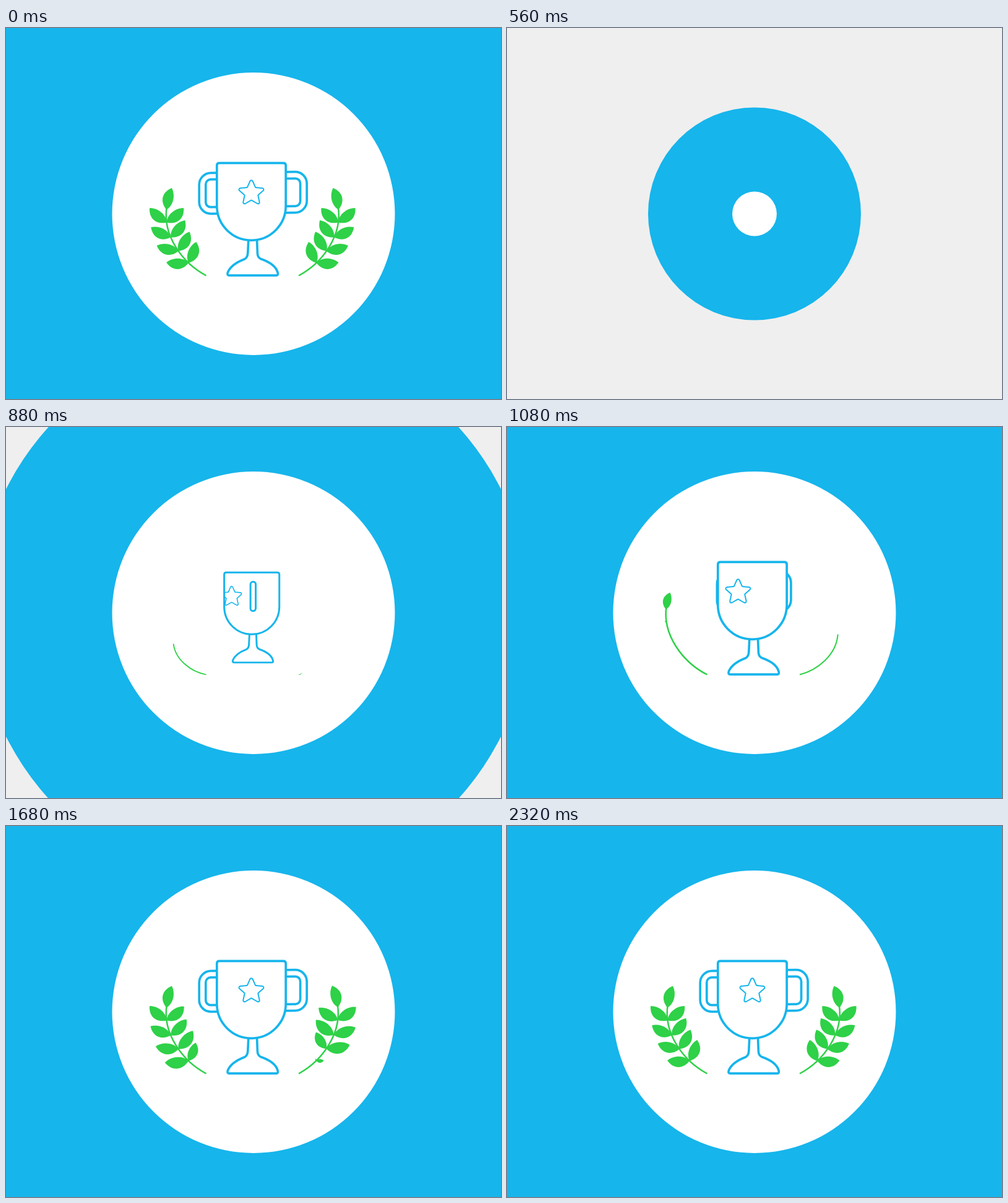
An HTML page with a canvas for the animation above (3.96 s loop, 800x600 px).

```html
<!DOCTYPE html>
<html lang="en">
<head>
<meta charset="utf-8">
<title>Trophy</title>
<style>
  html, body { margin: 0; width: 100%; height: 100%; overflow: hidden; background: #efefef; }
  canvas { display: block; width: 800px; height: 600px; }
</style>
</head>
<body>
<canvas id="stage" width="800" height="600"></canvas>
<script>
const ctx = document.getElementById('stage').getContext('2d');
const LOOP = 3960, STEP = 40, SETTLED = 3000;
const BLUE = '#16b5ec', GREEN = '#2ed147', GREY = '#efefef';
const MIRROR = 796.6, RIGHT_DELAY = 160;

const progress = (t, start, duration) => Math.max(0, Math.min(1, (t - start) / duration));
const smooth = x => x * x * (3 - 2 * x);
const mix = (a, b, u) => a + (b - a) * u;
const rad = deg => deg * Math.PI / 180;

function disc(radius, color) {
  ctx.fillStyle = color;
  ctx.beginPath();
  ctx.arc(400, 300.5, radius, 0, Math.PI * 2);
  ctx.fill();
}

// ---- Trophy ----
const cup = new Path2D('M344.8 218.3H448.2Q452.2 218.3 452.2 222.3V287.6A55.7 55.7 0 0 1 340.8 287.6V222.3Q340.8 218.3 344.8 218.3Z');
const foot = new Path2D('M391.8 343L390.8 364C390.6 368 389.5 372 385 374C372 379 362 387 358.5 395' +
  'Q356.8 400.2 360.5 400.2H436.5Q440.6 400.2 439 395C436 385 425 378 412 373.5C407.5 371.5 406.5 368 406.4 364L405.6 343');
const outsideCup = new Path2D('M0 0H800V600H0Z');
outsideCup.addPath(cup);

function ring(w, h, radius) {
  if (w <= 0 || h <= 0) return;
  ctx.beginPath();
  ctx.roundRect(-w / 2, -h / 2, w, h, Math.min(radius, w / 2, h / 2));
  ctx.stroke();
}

// Both handles are one band that grows tall, then widens behind the cup.
function handles(t) {
  if (t < 704) return;
  const band = 10.6;
  const h = mix(band, 66, progress(t, 704, 200));
  const w = mix(band, 174, progress(t, 900, 270));
  ctx.save();
  if (w > 113) ctx.clip(outsideCup, 'evenodd');
  ctx.translate(399.2, 266.5);
  ctx.transform(1, -0.0115, 0, 1, 0, 0);
  ring(w, h, 19);
  ring(w - 2 * band, h - 2 * band, 8);
  ctx.restore();
}

function star(t) {
  const slide = (1 - Math.cos(Math.PI * progress(t, 540, 970))) / 2;
  const cx = mix(340.5, 396.5, slide), cy = 267;
  const corner = i => {
    const r = i % 2 ? 11.3 : 24.3, a = i * Math.PI / 5;
    return [cx + r * Math.sin(a), cy - r * Math.cos(a)];
  };
  const [x0, y0] = corner(0), [x1, y1] = corner(-1);
  ctx.save();
  ctx.clip(cup);
  ctx.lineWidth = 2;
  ctx.beginPath();
  ctx.moveTo((x0 + x1) / 2, (y0 + y1) / 2);
  for (let i = 0; i < 10; i++) ctx.arcTo(...corner(i), ...corner(i + 1), i % 2 ? 1 : 2.3);
  ctx.closePath();
  ctx.stroke();
  ctx.restore();
}

function trophy(t) {
  const s = progress(t, 560, 400);
  if (!s) return;
  ctx.save();
  ctx.translate(400, 303.5);
  ctx.scale(s, s);
  ctx.translate(-400, -303.5);
  ctx.strokeStyle = BLUE;
  ctx.lineWidth = 3.7;
  ctx.lineJoin = 'round';
  star(t);
  handles(t);
  ctx.stroke(foot);
  ctx.stroke(cup);
  ctx.restore();
}

// ---- Laurel ----
const ROOT = [323.5, 400.5];
// Stem as a cubic curve from the root at 0,0
const BEND1 = [-38.5, -20.5], BEND2 = [-71.5, -65.5], TIP = [-63.5, -112.5];
const leafShape = new Path2D('M0 0C.25 .35 .69 .42 1 0C.72 -.25 .24 -.26 0 0Z');

function stemPoint(u) {
  const v = 1 - u;
  return [0, 1].map(k => 3 * v * v * u * BEND1[k] + 3 * v * u * u * BEND2[k] + u ** 3 * TIP[k]);
}

// The branch swings up past its rest angle and falls back.
function tilt(t) {
  return t < 1170
    ? mix(-30, 6, progress(t, 720, 450))
    : mix(6, 0, smooth(progress(t, 1170, 430)));
}

// Each leaf unfolds a little too far, sways and settles.
function leaf(u, angle, side, sway, age, grow) {
  if (age <= 0) return;
  const [x, y] = stemPoint(u);
  const size = 36 * mix(0, 1.07, progress(age, 0, 220)) * mix(1, 1 / 1.07, smooth(progress(age, 220, 300)));
  const swing = smooth(progress(age, 140, 160)) - smooth(progress(age, 300, 350));
  ctx.save();
  ctx.translate(x * grow, y * grow);
  ctx.rotate(rad(angle + sway * swing));
  ctx.scale(size, size * side);
  ctx.fill(leafShape);
  ctx.restore();
}

function laurel(t) {
  const grow = progress(t, 707, 307);
  if (!grow) return;
  const scaled = p => p.map(v => v * grow);
  ctx.save();
  ctx.translate(...ROOT);
  ctx.rotate(rad(tilt(t)));
  ctx.strokeStyle = ctx.fillStyle = GREEN;
  ctx.lineWidth = mix(0.8, 2.5, grow);
  ctx.beginPath();
  ctx.moveTo(0, 0);
  ctx.bezierCurveTo(...scaled(BEND1), ...scaled(BEND2), ...scaled(TIP));
  ctx.stroke();

  leaf(0.96, -76, -1, 8, t - 920, grow);
  for (let i = 0; i < 4; i++) {
    const u = 0.81 - 0.183 * i, age = t - (1060 + 85 * i + 15 * i * i);
    leaf(u, 180 + 40 - 13 * i, -1, -9, age, grow);
    leaf(u, -40 - 10 * i, 1, 9, age - 50, grow);
  }
  ctx.restore();
}

// ---- Scene ----
function draw(time) {
  const t = time < 80 ? SETTLED : time;
  ctx.fillStyle = GREY;
  ctx.fillRect(0, 0, 800, 600);
  if (t < 560) return;

  disc(Math.min(516, (t - 360) * 0.86), BLUE);
  const u = progress(t, 520, 240);
  disc(228.5 * mix(u, smooth(u), 0.1), '#fff');

  trophy(t);
  laurel(t);
  ctx.save();
  ctx.translate(MIRROR, 0);
  ctx.scale(-1, 1);
  laurel(t - RIGHT_DELAY);
  ctx.restore();
}

const begin = performance.now();
function tick() {
  const time = (performance.now() - begin) % LOOP;
  draw(Math.floor(time / STEP) * STEP);
  requestAnimationFrame(tick);
}
tick();
</script>
</body>
</html>
```
